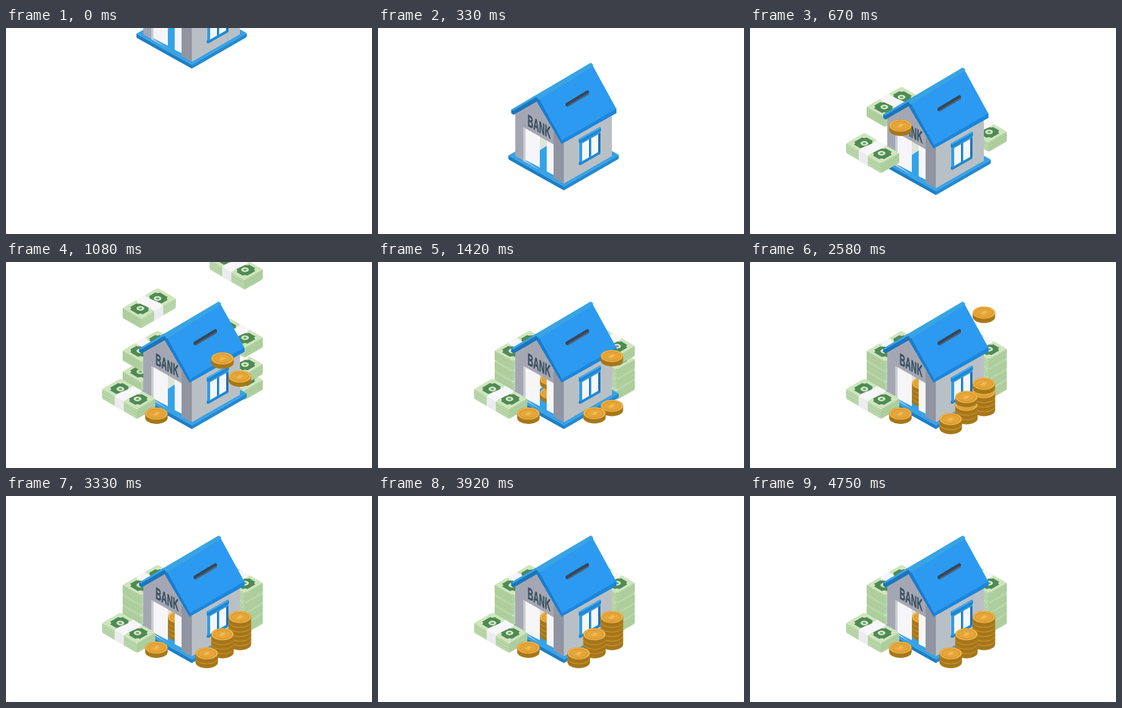
An HTML page that plays this animation: 640x360 px, repeating every 5 s.

```html
<!DOCTYPE html>
<html lang="en">
<head>
<meta charset="utf-8">
<title>Savings bank</title>
<style>
html, body { margin: 0; width: 100%; height: 100%; overflow: hidden; background: #fff; }
svg { display: block; width: 100%; height: 100%; }
text { font-family: "Liberation Sans", Arial, sans-serif; font-weight: bold; }
</style>
</head>
<body>
<svg viewBox="0 0 640 360">
  <defs>
    <!-- one half of a banknote, lying on the top of a bundle -->
    <g id="note">
      <path d="M9 5H20Q20 8 24 9V23Q20 24 20 27H9Q9 23 5 23V9Q9 9 9 5Z" fill="#508a55"/>
      <circle cx="16" cy="16" r="4.8" fill="#d6e8c6"/>
      <circle cx="16" cy="16" r="2" fill="#6b9f6b"/>
    </g>
    <!-- bundle of notes, left corner at 0,0 -->
    <g id="bundle">
      <path d="M1 0Q0 1 0 2V15Q0 17 2 18L58 50.5Q61 52.5 64 50.5L91 35Q93 34 93 32V16.5L61 35.2Z" fill="#b9d6aa"/>
      <path d="M61 35.2L93 16.7V32Q93 34 91 35L64 50.5Q62.5 51.5 61 51.5Z" fill="#afcf9f"/>
      <path d="M0 5.5L61 40.7L93 22.2M0 11L61 46.2L93 27.7" fill="none" stroke="#a2c494" stroke-width=".7"/>
      <path d="M22 12.7L38 21.9V39L22 29.8Z" fill="#ececf0"/>
      <g transform="matrix(1 .577 1 -.577 0 0)">
        <rect width="61" height="32" rx="3" fill="#cfe5bd"/>
        <use href="#note"/>
        <use href="#note" transform="matrix(-1 0 0 1 62 0)"/>
        <path d="M22 0H38Q36 8 38 16T38 32H22Q24 24 22 16T22 0Z" fill="#f7f7f9"/>
      </g>
    </g>
    <!-- coin, centre of the upper face at 0,0 -->
    <g id="coin">
      <path d="M-19.7 0V7.2A19.7 10.8 0 0 0 19.7 7.2V0Z" fill="#a97a1c"/>
      <path d="M-18 7A19.7 10.8 0 0 0 18 7" fill="none" stroke="#966a17" stroke-width="4" stroke-dasharray=".7 2.3"/>
      <ellipse rx="19.7" ry="10.8" fill="#d9992f"/>
      <ellipse rx="18.8" ry="9.9" cy="-.3" fill="#f0b64c"/>
      <ellipse rx="15.8" ry="8" fill="#e6a537" stroke="#c98c2a"/>
      <text transform="matrix(.85 .35 -.75 .45 0 0)" y="5" font-size="14" text-anchor="middle" fill="#f5c668">$</text>
    </g>
    <clipPath id="gap"><path d="M283 198L295.5 205V262H283Z"/></clipPath>
  </defs>

  <g id="back"></g>

  <g id="house">
    <path d="M228 231L325 285V292L230 239Q228 238 228 236Z" fill="#1e7fc4"/>
    <path d="M325 285L421 230V235Q421 237 419 238L325 292Z" fill="#2489d2"/>
    <path d="M228 231L325 176L421 230L325 285Z" fill="#35a2e8"/>
    <path d="M240 156L277 136L325 208V280L240 232Z" fill="#a4a7b3"/>
    <path d="M307 190L325 205V280L307 270Z" fill="#9195a2"/>
    <path d="M325 205L409 155V232L325 280Z" fill="#b9c0c5"/>
    <!-- doorway -->
    <path d="M254 181.5L307 212V270.5L254 240.5Z" fill="#c9ccd3"/>
    <path d="M258 184L307 212V225H258Z" fill="#dde5d9"/>
    <path d="M258 240L283 222L295 214L307 222V270.5L283 257Z" fill="#35a2e8"/>
    <g id="inside" clip-path="url(#gap)"></g>
    <path d="M258 184L283 198V252L258 239Z M295 205L307 212V265L295 259Z" fill="#f6f6f8"/>
    <text transform="matrix(.48 .272 0 1 261.5 179)" font-size="29" fill="#3a5362" stroke="#3a5362" stroke-width=".7">BANK</text>
    <!-- window -->
    <g transform="translate(0 -2)">
      <path d="M352 208L389 187V229L352 250Z" fill="#2e9be6"/>
      <path d="M357 212L369 205V236L357 243Z M373 203L385 196V227L373 234Z" fill="#f4f6f8"/>
      <path d="M369 205L371 204V235L369 236Z M385 196L389 194V228L385 229Z" fill="#1b72b8"/>
      <path d="M351 204L388 183L390 185V190L353 212L351 210Z M351 245L354 244V246L389 226V230L354 250L351 249Z" fill="#1f86d2"/>
      <path d="M351 204L388 183L390 185L353 206Z" fill="#3fa9ee"/>
    </g>
    <!-- roof -->
    <path d="M233 151L277 125L283 134L277 137L237 160L233 157Z" fill="#1c75bd"/>
    <path d="M233 151L277 125L372 69L376 72V77L282 135L277 129L236 153Z" fill="#38a4e4"/>
    <path d="M281 134L376 75L417 150L321 206Z" fill="#2c9af1"/>
    <path d="M277 136L282 133L322 205L321 211Z" fill="#1b7ccd"/>
    <path d="M321 205L417 149V157L321 211Z" fill="#1c86dc"/>
    <path d="M328 140L366 117L369 119V124L332 146L328 144Z" fill="#34475c"/>
    <path d="M331 144L369 121V124L332 146Z" fill="#52657a"/>
  </g>

  <g id="front"></g>
</svg>
<script>
const LOOP = 5000, FRAME = 1000 / 12, FALL = 500;
const $ = id => document.getElementById(id);
const items = [{ el: $("house"), x: 0, y: 0, start: 0, drop: 221, flip: "" }];

function add(layer, shape, x, y, start, flip = "") {
  const el = document.createElementNS("http://www.w3.org/2000/svg", "use");
  el.setAttribute("href", "#" + shape);
  $(layer).append(el);
  items.push({ el, x, y, start, drop: 140, flip });
}

// Stacks grow upwards, one start time for each piece.
function stack(layer, shape, x, y, step, starts, flip) {
  starts.forEach((start, i) => add(layer, shape, x, y - step * i, start, flip));
}

stack("back", "bundle", 297, 174.5, 18, [530, 838, 989], "scale(-1 1)");
stack("back", "bundle", 356, 189, 18, [447, 785, 907, 1082]);
stack("inside", "coin", 303, 236, 8, [1100, 1190, 1280, 1370]);
add("front", "bundle", 168, 222, 430);
add("front", "coin", 263, 265, 605);
stack("front", "coin", 409, 251.5, 8, [941, 1330, 1633, 1950, 2265, 2562]);
stack("front", "coin", 378.5, 265.7, 8, [1026, 1455, 1825, 2255]);
stack("front", "coin", 351, 283, 8, [1707, 2155]);

function draw(now) {
  const t = Math.floor((now % LOOP + 5) / FRAME) * FRAME;
  for (const { el, x, y, start, drop, flip } of items) {
    const p = Math.min(1, (t - start) / FALL);
    el.style.display = p < 0 ? "none" : "";
    el.setAttribute("transform", `translate(${x} ${y - drop * (1 - p) ** 3}) ${flip}`);
  }
}

const begin = performance.now();
function tick() {
  draw(performance.now() - begin);
  requestAnimationFrame(tick);
}
tick();
</script>
</body>
</html>
```
